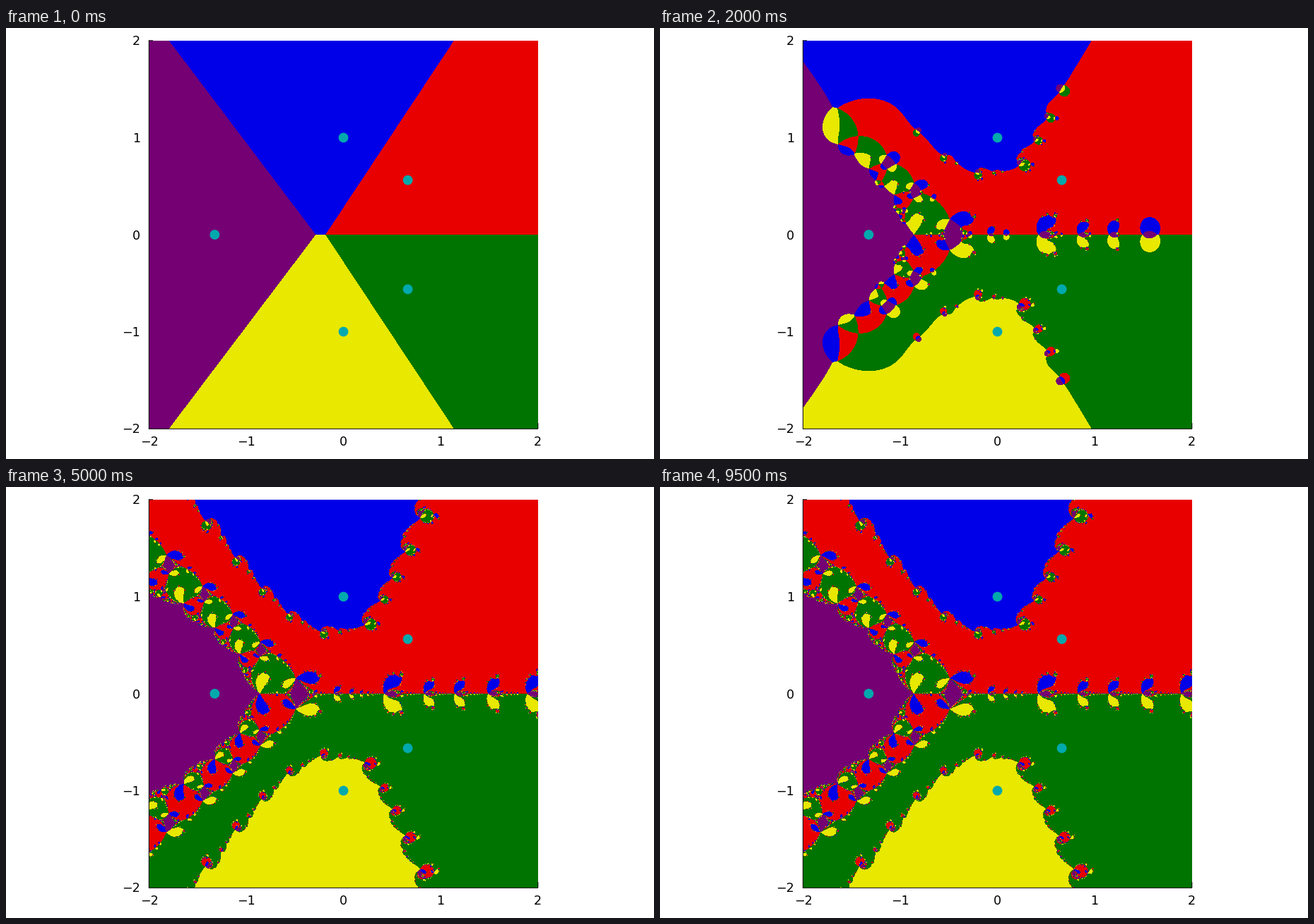
Animation of 917 by 611 pixels, one loop 10 s. Source, as a matplotlib script:

```python
import numpy as np
import matplotlib.pyplot as plt
from matplotlib.animation import FuncAnimation
from matplotlib.patches import Circle

W, H, DPI = 917, 611, 100
STEPS, INTERVAL = 20, 500
CX, CY, UNIT = 477.5, 293, 137.5
LEFT, RIGHT, TOP, BOTTOM = 202, 753, 18, 568
PT = 72 / DPI

plt.rcParams["font.family"] = "DejaVu Sans"

# Roots of z^5 + z^2 - z + 1 = (z^2 + 1)(z^3 - z + 1), one colour per basin
real_root, pair = -1.324718, 0.662359 + 0.562280j
ROOTS = [pair, pair.conjugate(), 1j, -1j, real_root]
COLORS = np.array([(232, 0, 0), (0, 116, 0), (0, 0, 232),
                   (232, 232, 0), (116, 0, 116)], dtype=np.uint8)


def newton(z):
    p = z**5 + z**2 - z + 1
    dp = 5 * z**4 + 2 * z - 1
    return z - p / dp


def basins(z):
    distance = np.stack([abs(z - r) for r in ROOTS])
    return distance.argmin(axis=0)


def all_steps():
    x = (np.arange(LEFT, RIGHT) + 0.5 - CX) / UNIT
    y = (CY - np.arange(TOP, BOTTOM) - 0.5) / UNIT
    z = x[None, :] + 1j * y[:, None]
    steps = []
    for _ in range(STEPS):
        steps.append(basins(z))
        z = newton(z)
    return steps


steps = all_steps()

fig = plt.figure(figsize=(W / DPI, H / DPI), dpi=DPI, facecolor="white")
ax = fig.add_axes([0, 0, 1, 1])
ax.set_axis_off()

image = ax.imshow(COLORS[steps[0]], extent=(LEFT, RIGHT, BOTTOM, TOP),
                  interpolation="nearest", aspect="auto")
ax.set_xlim(0, W)
ax.set_ylim(H, 0)


def line(xs, ys):
    ax.plot(xs, ys, color="black", lw=1.0 * PT, snap=False,
            solid_capstyle="butt", zorder=2)


line([202.3, 202.3], [TOP - 0.5, BOTTOM + 0.5])
line([202, 753], [568.3, 568.3])
line([752.8, 752.8], [560, 568])
line([202, 208], [17.8, 17.8])

for value in range(-2, 3):
    label = str(value).replace("-", "\u2212")
    px, py = CX + value * UNIT, CY - value * UNIT
    ax.text(px, 591.5, label, size=17.5 * PT, ha="center", va="baseline")
    ax.text(190, py + 6.5, label, size=17.5 * PT, ha="right", va="baseline")

for root in ROOTS:
    center = (CX + np.real(root) * UNIT, CY - np.imag(root) * UNIT)
    ax.add_patch(Circle(center, 6.9, color="#00a9ad", lw=0, zorder=3))


def update(frame):
    image.set_data(COLORS[steps[frame]])
    return (image,)


anim = FuncAnimation(fig, update, frames=STEPS, interval=INTERVAL,
                     repeat=True, repeat_delay=0)
plt.show()
```
